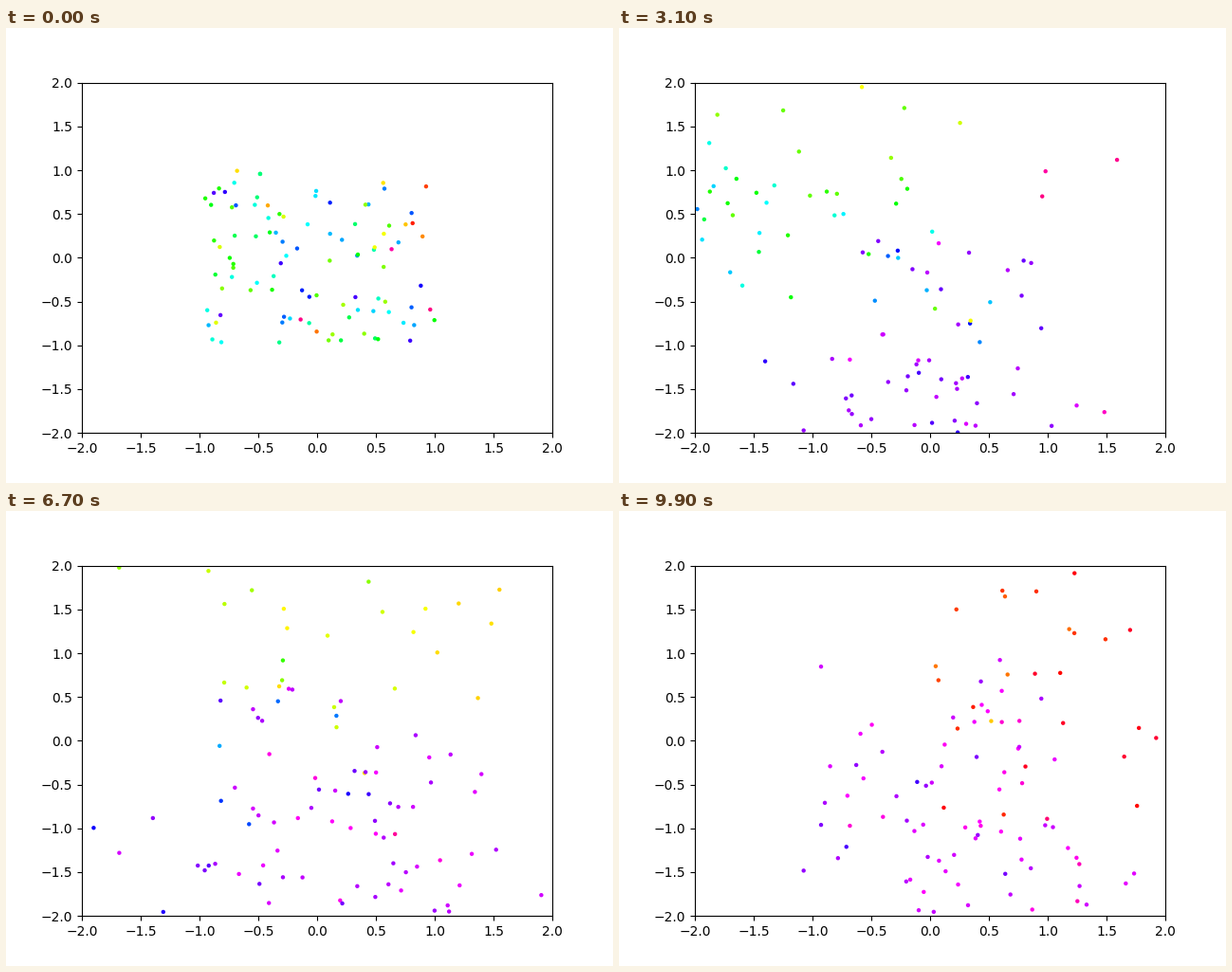
A matplotlib script for the animation above (10 s loop, 640 by 480 pixels).

```python
import numpy as np
import matplotlib.pyplot as plt
from matplotlib.animation import FuncAnimation
from matplotlib.colors import hsv_to_rgb

FRAMES, INTERVAL = 100, 100
COUNT, EDGE = 100, 2.0
SETTLE = 5  # frames until the first random headings have joined a course

rng = np.random.default_rng(11)
steps = np.arange(FRAMES)


def ease(start, length):
    """Smooth step from 0 to 1 over the given frames."""
    u = np.clip((steps - start) / length, 0, 1)
    return u * u * (3 - 2 * u)


# Courses in degrees for each frame
def down():
    return 267 + 28 * steps / FRAMES


def up():
    leave = 18 - 26 * rng.random() ** 4
    return 181 - 104 * ease(leave, 22) - 70 * ease(57, 44)


def left():
    return 183 + 107 * ease(rng.uniform(18, 58), 28)


def right():
    return 30 - 100 * ease(22, 16)


def heading(course, spread):
    first = rng.normal(150, 65)
    first = course[0] + (first - course[0] + 180) % 360 - 180
    goal = course + rng.normal(0, spread)
    return first + (goal - first) * ease(0, SETTLE)


def simulate():
    pos = rng.uniform(-1, 1, (COUNT, 2))
    # The lower half flows down, the rest mostly left and then up.
    lower = pos[:, 1] + rng.normal(0, 0.25, COUNT) < 0.08
    angle = np.radians([
        heading(down(), 16) if low
        else heading(rng.choice([up, left, right], p=[0.54, 0.38, 0.08])(), 11)
        for low in lower]).T

    speed = rng.uniform(0.04, 0.08, (COUNT, 1))
    track = [pos]
    for a in angle[1:]:
        pos = pos + speed * np.column_stack([np.cos(a), np.sin(a)])
        gone = (np.abs(pos) > EDGE).any(axis=1)
        pos[gone] = rng.uniform(-1, 1, (gone.sum(), 2))
        track.append(pos)

    hue = angle / (2 * np.pi) % 1
    full = np.ones_like(hue)
    return track, hsv_to_rgb(np.stack([hue, full, full], axis=-1))


track, colors = simulate()

fig, ax = plt.subplots(figsize=(6.4, 4.8), dpi=100)
ax.set_xlim(-EDGE, EDGE)
ax.set_ylim(-EDGE, EDGE)
dots = ax.scatter(*track[0].T, s=10, c=colors[0], linewidths=0)


def update(i):
    dots.set_offsets(track[i])
    dots.set_facecolor(colors[i])
    return (dots,)


anim = FuncAnimation(fig, update, frames=FRAMES, interval=INTERVAL,
                     repeat=True, repeat_delay=0)
plt.show()
```
